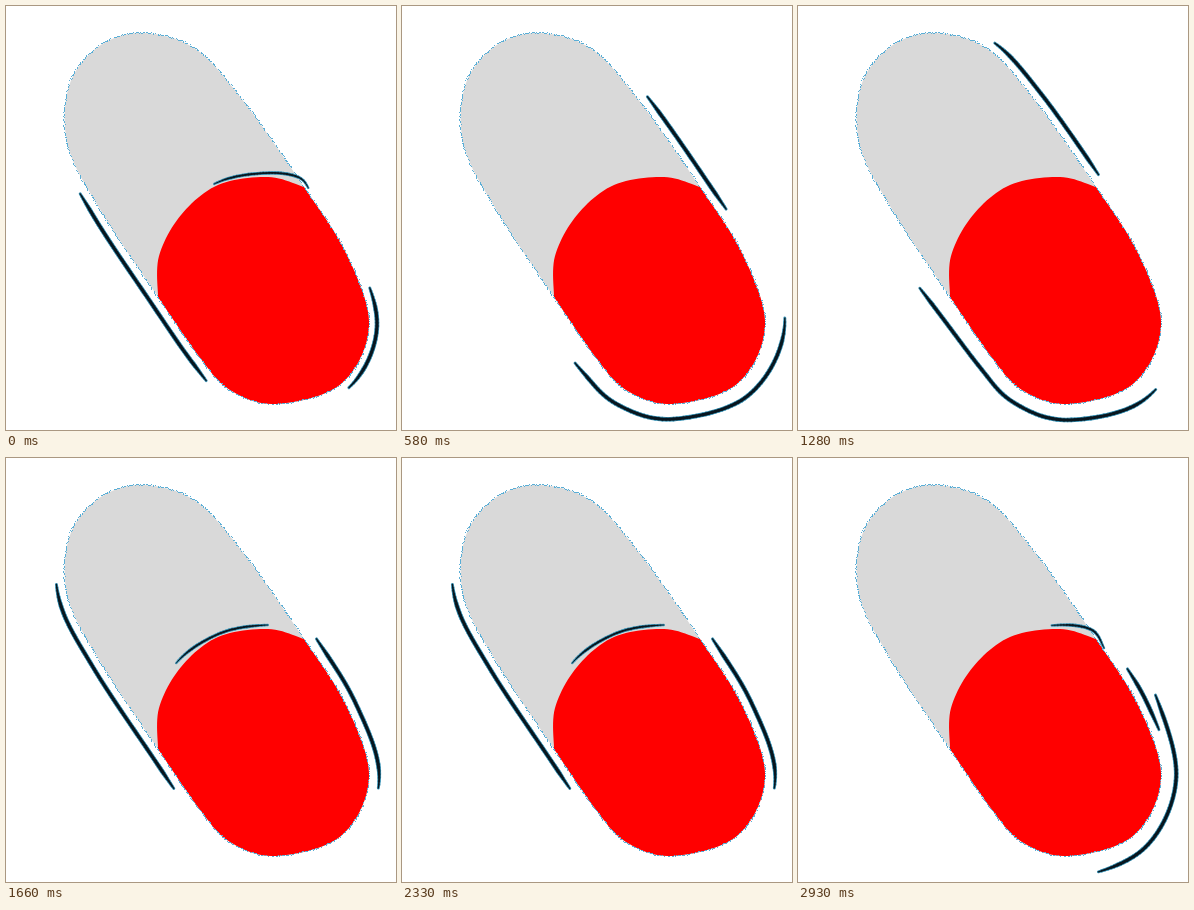
These frames come from a looping animation (390x424 px, 2.99 s). An HTML page with a canvas:

```html
<!DOCTYPE html>
<html lang="en">
<head>
<meta charset="utf-8">
<title>Capsule</title>
<style>
html, body { margin: 0; width: 100%; height: 100%; overflow: hidden; background: #fff; }
canvas { display: block; }
</style>
</head>
<body>
<canvas id="stage" width="390" height="424"></canvas>
<script>
const ctx = document.getElementById('stage').getContext('2d');
const LOOP = 2990, FRAMES = 48, CYCLE = 12, STEPS = 12;

const mod = (a, n) => ((a % n) + n) % n;
const mix = (a, b, t) => a + (b - a) * t;
const clamp = (v, lo, hi) => Math.max(lo, Math.min(hi, v));

// The first 28 drawings are held for about 64 ms, the others for 60 ms.
const startOf = i => i < 28 ? 10 * Math.round(6.4 * i + 0.4) : 1790 + 60 * (i - 28);

// Catmull-Rom curve, sampled with its running length.
function curve(keys, closed) {
  const n = keys.length, spans = closed ? n : n - 1;
  const at = i => keys[closed ? mod(i, n) : clamp(i, 0, n - 1)];
  const pts = [];
  for (let i = 0; i < spans; i++) {
    const [a, b, c, d] = [at(i - 1), at(i), at(i + 1), at(i + 2)];
    for (let k = 0; k < STEPS; k++) {
      const t = k / STEPS;
      pts.push([0, 1].map(j => 0.5 * (2 * b[j] + (c[j] - a[j]) * t
        + (2 * a[j] - 5 * b[j] + 4 * c[j] - d[j]) * t * t
        + (3 * b[j] - a[j] - 3 * c[j] + d[j]) * t * t * t)));
    }
  }
  pts.push(at(spans));
  const len = [0];
  for (let i = 1; i < pts.length; i++) {
    len.push(len[i - 1] + Math.hypot(pts[i][0] - pts[i - 1][0], pts[i][1] - pts[i - 1][1]));
  }
  return { pts, len, size: len[len.length - 1], closed };
}

function pointAt(c, s) {
  s = c.closed ? mod(s, c.size) : clamp(s, 0, c.size);
  let i = 1;
  while (i < c.len.length - 1 && c.len[i] < s) i++;
  const t = (s - c.len[i - 1]) / (c.len[i] - c.len[i - 1]);
  return [0, 1].map(j => mix(c.pts[i - 1][j], c.pts[i][j], t));
}

// The point at distance s along the curve, moved outwards by gap.
function offsetPoint(c, s, gap) {
  const p = pointAt(c, s), a = pointAt(c, s - 6), b = pointAt(c, s + 6);
  const l = Math.hypot(b[0] - a[0], b[1] - a[1]) || 1;
  return [p[0] + gap * (b[1] - a[1]) / l, p[1] + gap * (a[0] - b[0]) / l];
}

// Clockwise outline, starting at the lower left.
const body = curve([
  [195, 353], [152, 291], [95, 205], [62, 140], [63, 80],
  [92, 41], [135, 27], [188, 42], [235, 92], [298, 181],
  [341, 249], [363, 320], [335, 378], [270, 398], [224, 384]
], true);
const seam = curve([[298, 181], [262, 171], [212, 179], [175, 209], [153, 250], [152, 291]]);
const rim = curve([
  [306, 190], [294, 172], [262, 167], [215, 175],
  [172, 203], [150, 247], [145, 280], [161, 303]
]);

// The red half: the seam, then the outline from its end back to its start.
const lowerEdge = [...body.pts.slice(9 * STEPS), ...body.pts.slice(0, STEPS + 1)];
const lower = [...seam.pts, ...lowerEdge.reverse()];

// Ragged pixel outline, the same in every drawing.
let seed = 7;
function random() {
  seed = (seed * 16807) % 2147483647;
  return seed / 2147483647;
}
const specks = [];
for (let s = 0; s < body.size; s++) {
  const [x, y] = offsetPoint(body, s, random() * 1.4 - 0.4);
  if (random() < 0.75) specks.push([Math.floor(x), Math.floor(y)]);
}

function fill(pts, color) {
  ctx.beginPath();
  pts.forEach(p => ctx.lineTo(p[0], p[1]));
  ctx.fillStyle = color;
  ctx.fill();
}

// A brush stroke from s0 to s1: dark core, blue fringe, tapered ends.
function brush(c, s0, s1, width, gapAt) {
  const span = s1 - s0;
  if (span <= 0) return;
  const n = Math.ceil(span / 3), pts = [];
  for (let i = 0; i <= n; i++) {
    pts.push(offsetPoint(c, s0 + span * i / n, gapAt(i / n)));
  }
  for (const [color, extra] of [['#3b93b5', 1.6], ['#08161f', 0]]) {
    ctx.strokeStyle = color;
    for (let i = 0; i < n; i++) {
      const end = Math.min(i, n - 1 - i) * 3;
      ctx.lineWidth = width * mix(0.45, 1, Math.min(1, end / 18)) + extra;
      ctx.beginPath();
      ctx.moveTo(...pts[i]);
      ctx.lineTo(...pts[i + 1]);
      ctx.stroke();
    }
  }
}

function drawBand(p) {
  const q = mod(p + 2, CYCLE) - 1;
  const place = s => clamp(s, 0, rim.size);
  brush(rim, place(46 * q - 37), place(63 + 47 * q), 1.8, () => 0);
}

function drawClockwise(p) {
  brush(body, -20 + 53 * p + p * p, 204 + 64 * p - 1.3 * p * p, 3, () => 9);
}

// Length of the counter-clockwise stroke at a few phases.
const LENGTHS = [[0, 99], [2, 215], [5, 197], [8, 271], [11, 187]];
function lengthAt(p) {
  const i = LENGTHS.findIndex(k => k[0] >= p);
  if (i < 1) return LENGTHS[0][1];
  const [a, b] = [LENGTHS[i - 1], LENGTHS[i]];
  return mix(a[1], b[1], (p - a[0]) / (b[0] - a[0]));
}

function drawCounter(p) {
  const t = p / (CYCLE - 1);
  const ease = mix(t, (1 - Math.cos(Math.PI * t)) / 2, 0.5);
  const tail = 860 - 978 * ease;
  const lift = Math.min(1, p / 5);
  brush(body, tail - lengthAt(p), tail, 3,
    u => 8 + lift * (12 - 5 * Math.sin(Math.PI * u)));
}

function draw(p) {
  ctx.fillStyle = '#fff';
  ctx.fillRect(0, 0, 390, 424);
  ctx.lineCap = 'round';
  fill(body.pts, '#d9d9d9');
  fill(lower, '#f00');
  ctx.fillStyle = '#5aaed6';
  specks.forEach(([x, y]) => ctx.fillRect(x, y, 1, 1));
  drawBand(p);
  drawClockwise(p);
  drawCounter(p);
}

const begin = performance.now();
let shown = -1;
function tick() {
  const t = (performance.now() - begin) % LOOP;
  let i = FRAMES - 1;
  while (i > 0 && startOf(i) > t) i--;
  if (i !== shown) draw((shown = i) % CYCLE);
  requestAnimationFrame(tick);
}
tick();
</script>
</body>
</html>
```
